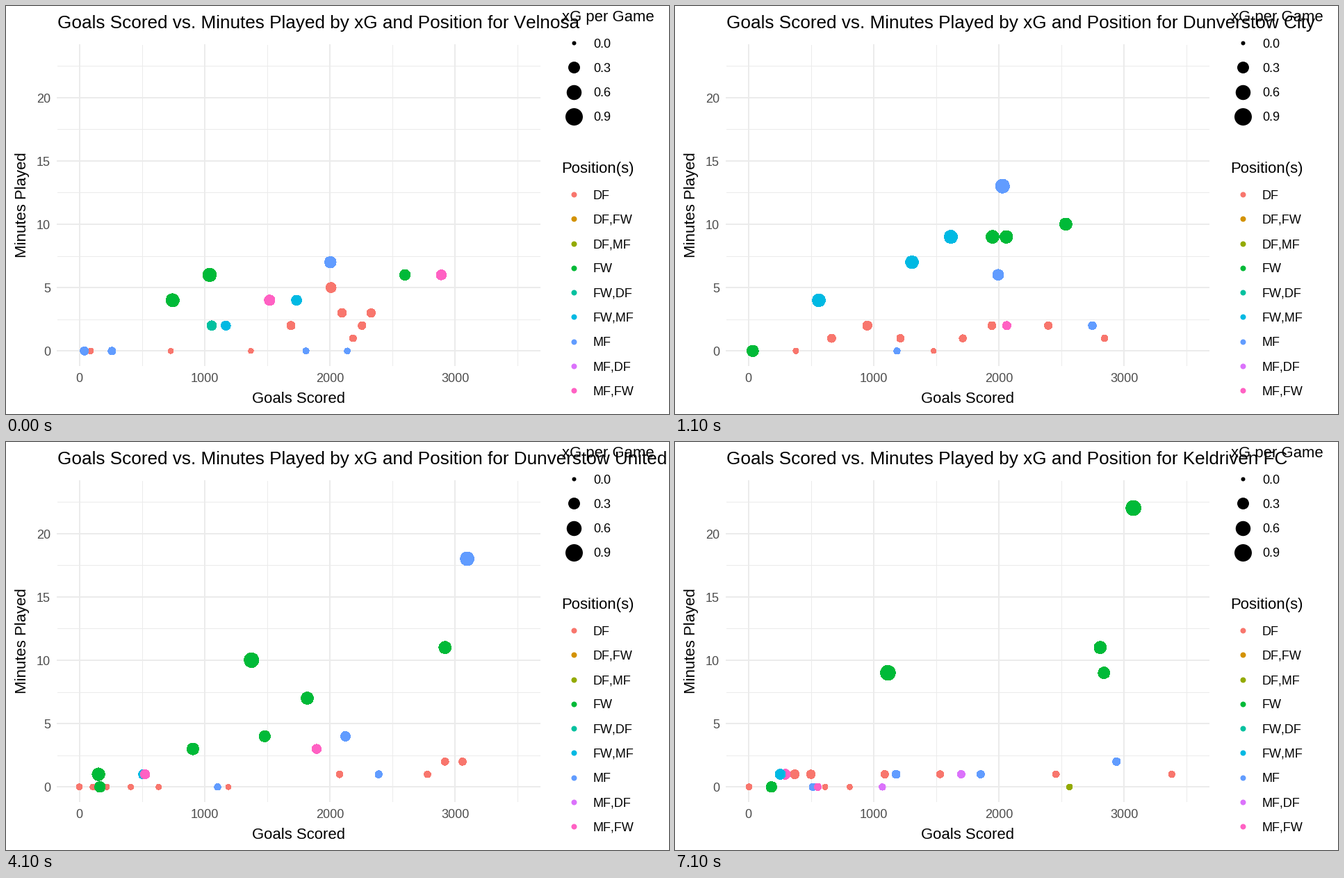
A matplotlib script for the animation above (8000 ms loop, 954 by 587 pixels).

```python
import numpy as np
import matplotlib.pyplot as plt
from matplotlib.animation import FuncAnimation

W, H, DPI = 954, 587, 64
PT = 72 / DPI
LOOP_MS, STEP_MS = 8000, 100
FIRST_MOVE_MS, CYCLE_MS, TWEEN_MS, TWEENS = 500, 3000, 200, 4

COLORS = {
    "DF": "#F8766D", "DF,FW": "#D39200", "DF,MF": "#93AA00",
    "FW": "#00BA38", "FW,DF": "#00C19F", "FW,MF": "#00B9E3",
    "MF": "#619CFF", "MF,DF": "#DB72FB", "MF,FW": "#FF61C3",
}

# Chances per game expected before anything is known about a player.
TYPICAL_XG = {"FW": 0.3, "DF": 0.02}
MIXED_XG = 0.1
TYPICAL_GAMES = 5


def squad(count, *keys):
    """Spread players evenly along a few (minutes, goals) key points."""
    minutes, goals = zip(*keys)
    at = np.linspace(0, len(keys) - 1, count)
    steps = range(len(keys))
    return list(zip(np.interp(at, steps, minutes),
                    np.rint(np.interp(at, steps, goals))))


# (minutes, goals) per position in drawing order; players with the same
# index in a position turn into each other.
TEAMS = [
    ("Velnosa", {
        "FW,DF": [(1057, 2)],
        "DF": squad(9, (2330, 3), (2185, 1), (2010, 5), (1370, 0), (90, 0)),
        "FW": [(2600, 6), (1040, 6), (745, 4)],
        "FW,MF": [(1735, 4), (1170, 2)],
        "MF": [(2005, 7), (2140, 0), (1810, 0), (260, 0), (40, 0)],
        "MF,FW": [(2890, 6), (1520, 4)],
    }),
    ("Dunverstow City", {
        "DF": squad(9, (2845, 1), (1945, 2), (1480, 0), (950, 2), (380, 0)),
        "FW": [(2535, 10), (1950, 9), (2060, 9), (35, 0)],
        "FW,MF": [(1617, 9), (1307, 7), (563, 4)],
        "MF": [(2030, 13), (2747, 2), (1995, 6), (1187, 0)],
        "MF,FW": [(2064, 2)],
    }),
    ("Dunverstow United", {
        "DF": squad(10, (3060, 2), (2745, 1), (745, 0), (245, 0), (0, 0)),
        "FW": [(2920, 11), (1820, 7), (1480, 4), (1375, 10), (907, 3),
               (153, 1), (165, 0)],
        "FW,MF": [(510, 1)],
        "MF": [(2390, 1), (3097, 18), (2125, 4), (1104, 0)],
        "MF,FW": [(1895, 3), (525, 1)],
    }),
    ("Keldriven FC", {
        "DF": squad(10, (3382, 1), (1300, 1), (670, 0), (415, 1), (5, 0)),
        "DF,MF": [(2565, 0)],
        "FW": [(3075, 22), (2840, 9), (2810, 11), (1115, 9), (185, 0)],
        "MF": [(1855, 1), (2940, 2), (1180, 1), (515, 0)],
        "MF,DF": [(1070, 0), (1700, 1)],
        "MF,FW": [(555, 0), (295, 1)],
        "FW,MF": [(255, 1)],
    }),
]

plt.rcParams["font.family"] = "Liberation Sans"
plt.rcParams["text.kerning_factor"] = 6  # practically no kerning

fig = plt.figure(figsize=(W / DPI, H / DPI), dpi=DPI, facecolor="white")
ax = fig.add_axes([0, 0, 1, 1])
ax.set_xlim(0, W)
ax.set_ylim(H, 0)
ax.axis("off")


def px_x(minutes):
    return 105.5 + 0.1802 * minutes


def px_y(goals):
    return 496.3 - 18.24 * goals


def radius(xg):
    return 3 + 10 * np.sqrt(xg)


def area(r):
    return (2 * r * PT) ** 2


def place(position, minutes, goals):
    """Centre and radius in pixels; xG leans on the position's usual rate."""
    prior = TYPICAL_XG.get(position, MIXED_XG) * TYPICAL_GAMES
    xg = (goals + prior) / (minutes / 90 + TYPICAL_GAMES)
    return np.array([px_x(minutes), px_y(goals), radius(xg)])


def layout(team):
    return {position: [place(position, *player) for player in players]
            for position, players in team.items()}


def label(x, y, text, size, color="black", **kwargs):
    return ax.text(x, y, text, fontsize=size * PT, color=color,
                   va="baseline", **kwargs)


def dot(x, y, r, color):
    ax.scatter([x], [y], s=area(r), c=[color], linewidths=0,
               antialiased=False)


def grid_line(xs, ys, major):
    ax.plot(xs, ys, color="#EBEBEB", lw=(2 if major else 1) * PT,
            zorder=0.5 if major else 0)


def draw_grid():
    for i in range(8):
        x, major = px_x(500 * i), i % 2 == 0
        grid_line([x, x], [56, 517], major)
        if major:
            label(x, 541, str(500 * i), 18, "#4D4D4D", ha="center")
    for i in range(10):
        y, major = px_y(2.5 * i), i % 2 == 0
        grid_line([74, 768], [y, y], major)
        if major:
            label(64, y + 7, str(5 * i // 2), 18, "#4D4D4D", ha="right")
    label(421, 571, "Goals Scored", 22.1, ha="center")
    label(29, 286.5, "Minutes Played", 22.1, ha="center",
          rotation=90, rotation_mode="anchor")


def draw_legend(heading, baseline, first_y, entries):
    label(799.5, baseline, heading, 22.1)
    for i, (text, r, color) in enumerate(entries):
        y = first_y + 35.25 * i
        dot(817, y, r, color)
        label(845, y + 6.6, text, 18)


def blend(start, end, t):
    """Move paired players; unpaired ones wait for the end of the move."""
    if t == 1:
        return end
    mixed = {}
    for position, players in start.items():
        targets = end.get(position, [])
        targets = targets + players[len(targets):]
        mixed[position] = [p + (q - p) * t for p, q in zip(players, targets)]
    return mixed


draw_grid()
draw_legend("xG per Game", 22, 53,
            [(f"{xg:.1f}", radius(xg), "black") for xg in (0, 0.3, 0.6, 0.9)])
draw_legend("Position(s)", 240, 271,
            [(position, 4, color) for position, color in COLORS.items()])
title = label(74, 32, "", 26.1)
points = ax.scatter([], [], linewidths=0, zorder=2, antialiased=False)
STATES = [(name, layout(team)) for name, team in TEAMS]


def update(frame):
    stage, elapsed = divmod(frame * STEP_MS - FIRST_MOVE_MS, CYCLE_MS)
    t = min(1, (elapsed // TWEEN_MS + 1) / TWEENS)
    start, end = STATES[max(stage, 0)], STATES[stage + 1]
    team = end[0] if t > 0.5 else start[0]
    title.set_text("Goals Scored vs. Minutes Played by xG and Position for "
                   + team)
    state = blend(start[1], end[1], t)
    spots = np.array([spot for group in state.values() for spot in group])
    points.set_offsets(spots[:, :2])
    points.set_sizes(area(spots[:, 2]))
    points.set_facecolor([COLORS[position] for position, group in state.items()
                          for _ in group])
    return title, points


anim = FuncAnimation(fig, update, frames=LOOP_MS // STEP_MS, interval=STEP_MS,
                     repeat=True, repeat_delay=0, blit=False)
plt.show()
```
